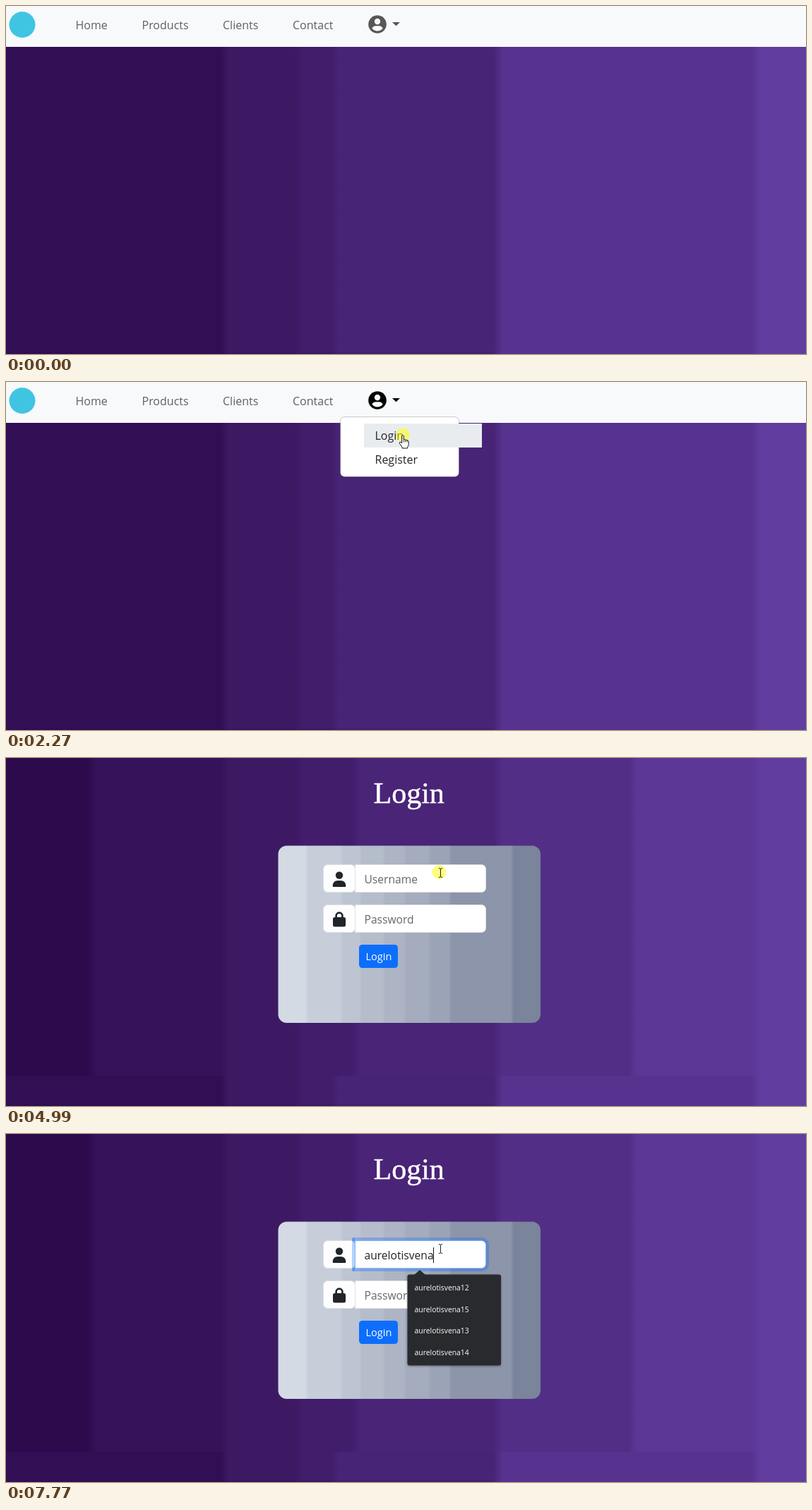
Write an HTML page with a canvas that moves like this. It is 1133 px wide and 494 px high and loops after 8 s.

```html
<!DOCTYPE html>
<html lang="en">
<head>
<meta charset="utf-8">
<title>Login</title>
<style>
html, body { margin: 0; width: 100%; height: 100%; overflow: hidden; background: #320f50; }
canvas { display: block; }
</style>
</head>
<body>
<canvas id="stage" width="1133" height="494"></canvas>
<script>
const W = 1133, H = 494, LOOP = 8000;
const ctx = document.getElementById('stage').getContext('2d');
const SANS = '"Open Sans", "Noto Sans", sans-serif';
const SERIF = '"Liberation Serif", serif';
const DARK = '#212529', BORDER = '#dee2e6', LINK = '#5f6062', BAR = '#f8f9fa';

const OPEN_AT = 1590, CLOSE_AT = 2410, LOGIN_AT = 4010, FOCUS_AT = 5065, SUGGEST_AT = 5140;
const CLICKS = [2270, 4990], CLICK_LENGTH = 70;

// The pointer glides in a few discrete steps, then rests until the next glide.
const GLIDES = [
  { start: 320, end: 600, steps: 5, from: [1073, 468], to: [597.5, 165] },
  { start: 750, end: 1150, steps: 7, from: [597, 152], to: [553, 25.5] },
  { start: 1590, end: 2090, steps: 8, from: [554.5, 30.5], to: [562, 75] },
  { start: 2610, end: 2820, steps: 4, from: [580, 82], to: [712.5, 125] },
  { start: 4280, end: 4660, steps: 6, from: [710, 125], to: [615.5, 156] }
];

const USER = 'aurelotisvena';
const ACCOUNTS = [USER + 12, USER.slice(0, 6), USER + 15, USER + 13, USER + 14, 'nolvara'];
const BURSTS = [
  { start: 5680, keys: 2, gap: 200 }, { start: 6090, keys: 3, gap: 95 },
  { start: 6560, keys: 3, gap: 140 }, { start: 7160, keys: 3, gap: 165 },
  { start: 7640, keys: 2, gap: 130 }
];

const clamp = (v, low, high) => Math.min(high, Math.max(low, v));
const mix = (a, b, u) => a + (b - a) * u;
const easeOut = u => 1 - (1 - u) ** 1.5;

// A linear gradient reduced to flat bands, each in the colour of its middle.
function bandFill(edges, first, last, blend) {
  const left = edges[0], width = edges[edges.length - 1] - left;
  const fill = ctx.createLinearGradient(left, 0, left + width, 0);
  for (let i = 0; i + 1 < edges.length; i++) {
    const a = (edges[i] - left) / width, b = (edges[i + 1] - left) / width;
    const color = `rgb(${first.map((c, k) => Math.round(mix(c, last[k], (a + b) / 2)))})`;
    fill.addColorStop(i ? a + blend / width : 0, color);
    fill.addColorStop(i + 2 < edges.length ? b - blend / width : 1, color);
  }
  return fill;
}
const PLUM = [42, 7, 71], VIOLET = [100, 63, 163];
const homeFill = bandFill([0, 310, 415, 466, 697, 1062, W], PLUM, VIOLET, 6);
const loginFill = bandFill([0, 122, 310, 415, 495, 697, 888, 1062, W], PLUM, VIOLET, 6);
const cardFill = bandFill([385, 426, 475, 502, 535, 565, 600, 629, 717, 757],
  [217, 223, 233], [117, 127, 150], 2);

function rect(x, y, w, h, color) {
  ctx.fillStyle = color;
  ctx.fillRect(x, y, w, h);
}

function box(x, y, w, h, radius, fill, stroke) {
  ctx.beginPath();
  ctx.roundRect(x, y, w, h, radius);
  ctx.fillStyle = fill;
  ctx.fill();
  if (stroke) { ctx.strokeStyle = stroke; ctx.lineWidth = 1; ctx.stroke(); }
}

function disc(x, y, r, color) {
  ctx.beginPath();
  ctx.arc(x, y, r, 0, 2 * Math.PI);
  ctx.fillStyle = color;
  ctx.fill();
}

function text(label, x, y, size, color, family = SANS, weight = 400) {
  ctx.font = `${weight} ${size}px ${family}`;
  ctx.fillStyle = color;
  ctx.fillText(label, x, y);
}

function shape(path, x, y, fill, stroke) {
  const outline = new Path2D(path);
  ctx.save();
  ctx.translate(x, y);
  ctx.fillStyle = fill;
  ctx.fill(outline);
  if (stroke) {
    ctx.strokeStyle = stroke;
    ctx.lineWidth = 1;
    ctx.lineJoin = 'round';
    ctx.stroke(outline);
  }
  ctx.restore();
}

function pointerAt(t) {
  const glide = GLIDES.findLast(g => t >= g.start);
  if (!glide) return null;
  const { start, end, steps, from, to } = glide;
  const step = Math.floor((t - start) / (end - start) * (steps - 1) + 1e-6);
  const u = easeOut(clamp(step / (steps - 1), 0, 1));
  const x = mix(from[0], to[0], u), y = mix(from[1], to[1], u);
  const open = t >= OPEN_AT && t < CLOSE_AT;
  const onIcon = t < LOGIN_AT && y < 45, onItem = open && y > 59;
  const onField = t >= LOGIN_AT && y > 151;
  return { x, y, open, onIcon, onItem, kind: onField ? 'beam' : onIcon || onItem ? 'hand' : 'arrow' };
}

function typedText(t) {
  let count = 0;
  for (const { start, keys, gap } of BURSTS) {
    count += clamp(Math.floor((t - start) / gap) + 1, 0, keys);
  }
  return USER.slice(0, count);
}

function drawHome(t, pointer) {
  const { open, onIcon, onItem } = pointer || {};
  const ink = open ? '#000' : onIcon ? '#323232' : '#575758';
  rect(0, 0, W, 58, BAR);
  disc(23, 26.5, 18.5, '#3fc5e2');
  text('Home', 98.5, 33, 16, LINK);
  text('Products', 192.5, 33, 16, LINK);
  text('Clients', 307, 33, 16, LINK);
  text('Contact', 406, 33, 16, LINK);

  disc(526, 26, 12.8, ink);
  disc(526, 22, 4.2, BAR);
  shape('M-7.6 5.8Q-6 2.2-2.5 2.2H2.5Q6 2.2 7.6 5.8Q4.5 9.6 0 9.6Q-4.5 9.6-7.6 5.8Z', 526, 26, BAR);
  shape('M0 0H11L5.5 5.2Z', 547, 23, ink);

  if (!open) return;
  box(473.5, 49.5, 168, 85, 6, '#fff', 'rgba(0,0,0,.2)');
  if (onItem) rect(507, 59, 167, 34, '#e9ecef');
  text('Login', 522.5, 82, 16, DARK);
  text('Register', 522.5, 116, 16, DARK);
}

function drawField(y, label, focused) {
  if (focused) box(490, y - 4, 194, 48, [4, 10, 10, 4], 'rgba(13,110,253,.32)');
  box(449.5, y + .5, 45, 39, 6, '#fdfdfe', BORDER);
  if (focused) rect(490, y - 4, 4, 48, 'rgba(13,110,253,.3)');
  box(494.5, y + .5, 185, 39, [0, 6, 6, 0], '#fff', focused ? '#86b7fe' : BORDER);
  text(label, 507.5, y + 27, 15.6, '#63676a');
}

function drawFieldIcons() {
  disc(472, 166.5, 5.2, DARK);
  shape('M-9.3 9Q-9.3 1-2 1H2Q9.3 1 9.3 9Q9.3 10 8 10H-8Q-9.3 10-9.3 9Z', 472, 173, DARK);
  box(463, 226, 18, 13.5, 2.5, DARK);
  ctx.beginPath();
  ctx.moveTo(467.6, 227);
  ctx.arc(472, 224, 4.4, Math.PI, 0);
  ctx.lineTo(476.4, 227);
  ctx.strokeStyle = DARK;
  ctx.lineWidth = 2.6;
  ctx.stroke();
}

function drawSuggestions(typed) {
  const rows = ACCOUNTS.filter(name => name.startsWith(typed));
  const pitch = 30.6;
  ctx.save();
  ctx.shadowColor = 'rgba(0,0,0,.4)';
  ctx.shadowBlur = 3;
  ctx.shadowOffsetY = 1;
  box(568.5, 199.5, 132.5, rows.length * pitch + 6.5, 3, '#292a2d');
  ctx.restore();
  shape('M-8 7L0 0L8 7Z', 586, 193, '#292a2d');
  rows.forEach((row, i) => text(row, 578.5, 222 + i * pitch, 10.4, '#fff', SANS, 500));
}

function drawLogin(t) {
  const typed = typedText(t), focused = t >= FOCUS_AT;
  rect(0, 0, W, 451, loginFill);
  text('Login', 520.5, 64, 42, '#fff', SERIF);
  ctx.strokeStyle = '#fff';
  ctx.lineWidth = .5;
  ctx.strokeText('Login', 520.5, 64);

  box(385.5, 124.5, 371.5, 251.5, 12, cardFill);
  drawField(151, typed ? '' : 'Username', focused);
  drawField(208, 'Password', false);
  drawFieldIcons();
  box(500, 265, 55, 33, 4.5, '#0d6efd');
  text('Login', 509.5, 287, 14.5, '#fff');

  if (!focused) return;
  text(typed, 507.5, 178, 15.6, DARK);
  rect(Math.round(507 + ctx.measureText(typed).width), 161, 1, 22, '#111');
  if (t >= SUGGEST_AT) drawSuggestions(typed);
}

function drawBeam(x, y) {
  rect(x - .5, y + 1, 1, 12, '#222');
  for (const dy of [.2, 12.8]) {
    for (const dx of [-2.7, .5]) rect(x + dx, y + dy, 2.2, 1, '#222');
  }
}

function drawHand(x, y) {
  shape('M-1.3 1.5Q0-.5 1.3 1.5V7Q2.5 5.6 3.7 7.3Q5 6.3 6 8Q7.8 7.5 8.2 9.5V13.5Q8 16 6.7 17.3V19H-1V17.3L-4.4 12.5Q-5.4 10.8-4 10.2Q-2.7 10-1.3 12Z', x, y, '#fff', '#111');
  for (let i = 0; i < 3; i++) rect(x + .8 + i * 2.35, y + 7, .8, 3.5, '#111');
}

function drawPointer(t, { x, y, kind }) {
  if (CLICKS.some(at => t >= at && t < at + CLICK_LENGTH)) {
    const beam = kind === 'beam';
    disc(beam ? x - 2 : x, beam ? y + 6 : y, 10, 'rgba(255,255,0,.5)');
  }
  if (kind === 'beam') drawBeam(x, y);
  else if (kind === 'hand') drawHand(x, y);
  else shape('M.5 .5V13.5L3.5 10.7L5.7 15.8L7.8 14.9L5.6 10H9.5Z', x, y, '#fff', '#111');
}

function frame(now) {
  const t = now % LOOP, pointer = pointerAt(t);
  rect(0, 0, W, H, homeFill);
  rect(20, 492, 672, 2, 'rgba(30,5,50,.15)');
  if (t < LOGIN_AT) drawHome(t, pointer);
  else drawLogin(t);
  if (pointer) drawPointer(t, pointer);
}

const start = performance.now();
function tick() {
  frame(performance.now() - start);
  requestAnimationFrame(tick);
}
tick();
</script>
</body>
</html>
```
